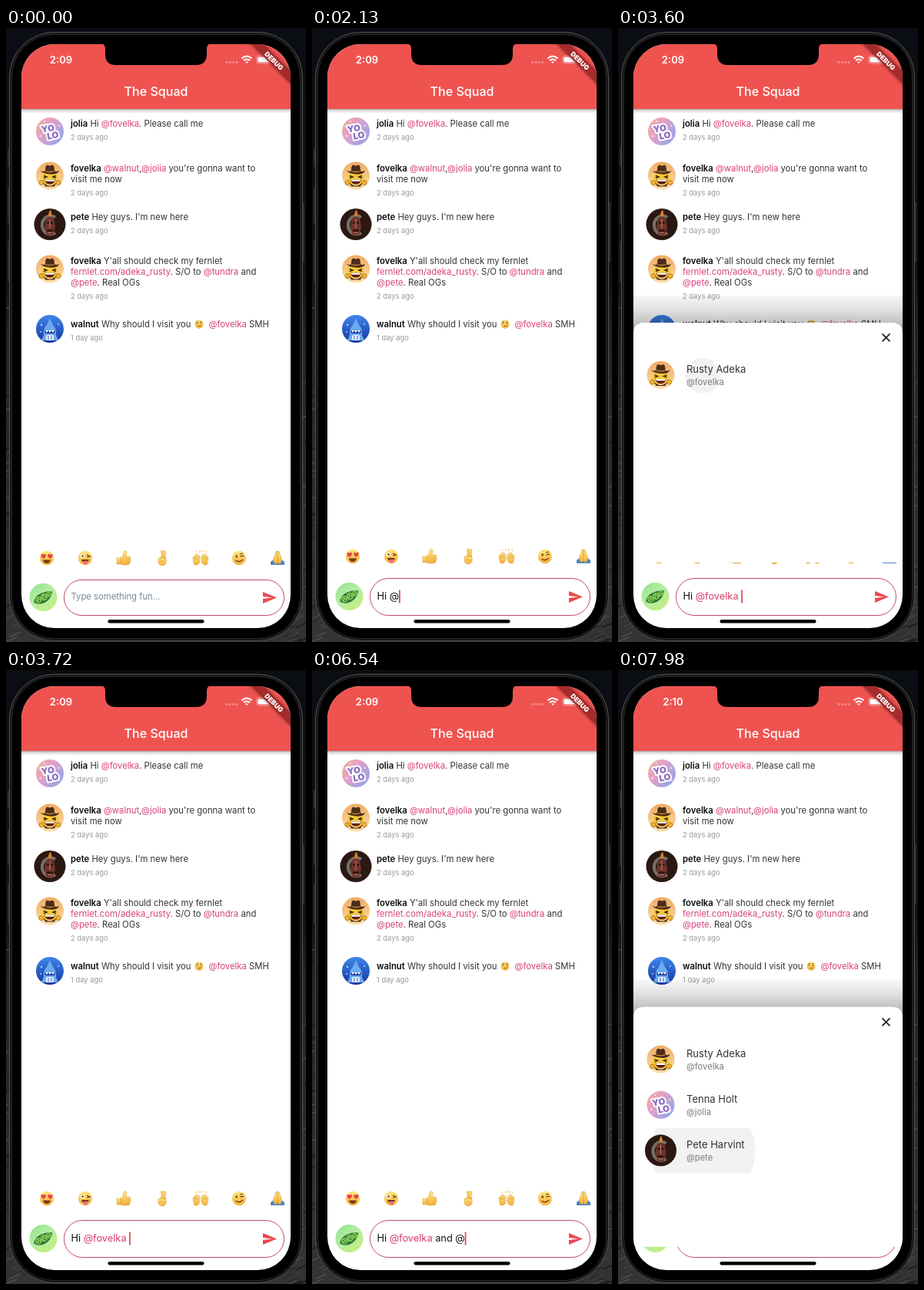
These frames come from a looping animation (390 by 796 pixels, 8 s). An HTML page:

```html
<!DOCTYPE html>
<html lang="en">
<head>
<meta charset="utf-8">
<title>Group chat mentions</title>
<style>
html, body { margin: 0; width: 100%; height: 100%; overflow: hidden; background: #0b0b0b; }
svg { display: block; width: 390px; height: 796px; font-family: Inter, Roboto, sans-serif; }
text { white-space: pre; }
.msg { font-size: 11.3px; fill: #333; }
.msg .b { font-weight: 600; fill: #0c0c0c; }
.at { fill: #d8407c; }
.ago { font-size: 9.4px; fill: #999; }
.name { font-size: 13px; fill: #333; }
.handle { font-size: 11.2px; fill: #7b7b7b; }
.typed { font-size: 12.8px; fill: #111; }
.typed .at { fill: #d63a66; }
</style>
</head>
<body>
<svg viewBox="0 0 390 796">
<defs>
  <clipPath id="screen"><rect x="20" y="21" width="350" height="757" rx="43"/></clipPath>
  <clipPath id="row"><rect id="rowClip" x="20" width="350" height="59"/></clipPath>
  <clipPath id="strip"><rect x="31" y="660" width="331" height="60"/></clipPath>
  <filter id="soft" x="-30%" y="-80%" width="160%" height="260%"><feGaussianBlur stdDeviation="2"/></filter>
  <linearGradient id="desk" x2="0" y2="1"><stop stop-color="#0a0d13"/><stop offset=".4" stop-color="#101113"/><stop offset=".5" stop-color="#232322"/><stop offset="1" stop-color="#343432"/></linearGradient>
  <linearGradient id="bar" x2="0" y2="1"><stop stop-opacity=".32"/><stop offset=".4" stop-opacity=".12"/><stop offset="1" stop-opacity="0"/></linearGradient>
  <linearGradient id="shade" x2="0" y2="1"><stop stop-opacity=".03"/><stop offset=".35" stop-opacity=".12"/><stop offset="1" stop-opacity=".36"/></linearGradient>
  <linearGradient id="yellow" x2="0" y2="1"><stop stop-color="#ffe680"/><stop offset="1" stop-color="#f3b03c"/></linearGradient>
  <linearGradient id="candy" x2="1" y2=".7"><stop stop-color="#f2b296"/><stop offset=".45" stop-color="#e3a0c6"/><stop offset="1" stop-color="#93a6ea"/></linearGradient>
  <linearGradient id="peach" x2="0" y2="1"><stop stop-color="#f0ab62"/><stop offset="1" stop-color="#fbe0ac"/></linearGradient>
  <linearGradient id="sea" x2="0" y2="1"><stop stop-color="#3f86ea"/><stop offset="1" stop-color="#1737a0"/></linearGradient>
  <linearGradient id="leaf" x2=".8" y2="1"><stop stop-color="#8fe28c"/><stop offset=".5" stop-color="#b4edA4"/><stop offset="1" stop-color="#c3ee7e"/></linearGradient>

  <g id="sticker">
    <circle r="18" fill="url(#candy)"/>
    <g fill="#f8d0e4"><circle cx="-12" cy="6" r="1.6"/><circle cx="12" cy="-7" r="1.4"/><circle cx="-7" cy="-13" r="1.2"/><circle cx="12" cy="8" r="1.8"/></g>
    <g font-size="11.5" font-weight="900" text-anchor="middle" fill="#8a6cc4" stroke="#fff" stroke-width="4" stroke-linejoin="round" paint-order="stroke" transform="rotate(-10)">
      <text x="-2" y="0">YO</text><text x="3" y="10">LO</text>
    </g>
  </g>
  <g id="cowboy">
    <circle r="18" fill="url(#peach)"/>
    <path d="M-9 8Q0 18 9 8L6 14H-6Z" fill="#5a3218"/>
    <ellipse cy="3" rx="11" ry="9" fill="#f8c938"/>
    <path d="M-12-7Q-8-4-6-7Q-6-14-3-14Q0-12 3-14Q6-14 6-7Q8-4 12-7Q11-1 0-2T-12-7Z" fill="#4c2c1a"/>
    <path d="M-6-6Q0-4 6-6" stroke="#c98a3a" stroke-width="1.3" fill="none"/>
    <path d="M-8 0l4 1.5-4 1.5M8 0L4 1.5l4 1.5" stroke="#3a2010" stroke-width="1.4" fill="none"/>
    <path d="M-7 5H7Q6 11 0 11T-7 5Z" fill="#5e2110"/><path d="M-6 5H6V7.2H-6Z" fill="#fff"/>
    <g fill="#f2b62e" stroke="#8a5313" stroke-width=".6"><circle cx="-11" cy="9" r="3"/><circle cx="11" cy="9" r="3"/></g>
  </g>
  <g id="mask">
    <circle r="20.5" fill="#2b1812"/>
    <path d="M7-9A11 12 0 1 0 7 11" fill="none" stroke="#777069" stroke-width="4"/>
    <path d="M-5-8Q0-12 5-8L7 4 4 14H-4L-7 4Z" fill="#6e3529"/>
    <path d="M-2-11Q-2-16 1-19Q3-14 2-10Z" fill="#d9822b"/>
    <path d="M-4-2H-1M1-2H4M-4 8H4" stroke="#1c0d09" stroke-width="2"/>
    <path d="M0-7V5M-3 11H3" stroke="#b57263" stroke-width="1.2"/>
  </g>
  <g id="fish">
    <circle r="18" fill="url(#sea)"/>
    <path d="M0-14L4-5Q9 0 8 8L11 15H-11L-8 8Q-9 0-4-5Z" fill="#6ba9f0"/>
    <path d="M-7 2H7L6 6H-6Z" fill="#1d3f9e"/><path d="M-6 2l2 3 2-3 2 3 2-3 2 3 2-3" fill="#fff"/>
    <rect x="-5" y="8" width="10" height="7" rx="2" fill="#e6f2ff"/><path d="M-2 9V14M2 9V14" stroke="#2a58c4"/>
    <g fill="#a5cfff"><circle cx="-11" cy="-5" r="1.3"/><circle cx="11" cy="-6" r="1.1"/><circle cx="-12" cy="4" r="1"/></g>
  </g>
  <g id="peas">
    <circle r="18" fill="url(#leaf)"/>
    <g transform="rotate(-28)">
      <path d="M-14 0Q-9-7 0-6T14-1Q8 7-1 7T-14 0Z" fill="#2f7a35"/>
      <g fill="#7cc653"><circle cx="-7" r="4.2"/><circle cx="1" r="4.6"/><circle cx="8.3" r="3.5"/></g>
      <path d="M-9-1h1M-6-1h1M-1-1h1M2-1h1M7-1h1M9.5-1h1M-8 2h2M0 2h2M8 2h1" stroke="#173f1a" stroke-width="1.2"/>
    </g>
  </g>

  <circle id="face" r="9.2" fill="url(#yellow)"/>
  <g id="e0"><use href="#face"/><path d="M-5 2.5H5Q4 7 0 7T-5 2.5Z" fill="#7a3a12"/>
    <g fill="#e5404a"><path id="heart" d="M-4.3 1Q-8-1.5-7.3-4.2Q-5.7-6-4.3-4Q-2.5-6-1-4.2Q-.6-1.5-4.3 1Z"/><use href="#heart" x="8.6"/></g></g>
  <g id="e1"><use href="#face"/><path d="M-5 2H5Q4 6 0 6T-5 2Z" fill="#7a3a12"/><path d="M-2 4H3V7Q.5 10-2 7Z" fill="#ee6a84"/>
    <circle cx="-3.7" cy="-2.5" r="2.5" fill="#fff"/><circle cx="-3.5" cy="-2.5" r="1.2" fill="#4a2810"/><path d="M2-4L6-2 2-1" stroke="#6b3a12" stroke-width="1.2" fill="none"/></g>
  <g id="e2" fill="url(#yellow)" stroke="#d99a34" stroke-width=".5"><path d="M-9 0H-4V8H-9Z"/>
    <path d="M-4 0Q0-3 0-8Q1-11 4-8Q4-5 3-2H7Q10-1 8.5 2Q10 4 8 5.5Q8.5 9 5 9H-1Q-4 9-4 7Z"/><path d="M4 2H8M4 5.5H8"/></g>
  <g id="e3" fill="url(#yellow)" stroke="#d99a34" stroke-width=".6"><path d="M2 2L-2-8Q-1-11 1-9L5 1Z"/><path d="M-3 2L2-9Q5-10 5-7L2 2Z"/>
    <path d="M-5 1Q-4-1-2 1Q0-1 4 1Q6 2 5 6Q4 10 0 10Q-5 9-5 5Z"/><path d="M-3 4Q1 3 3 6" fill="none"/></g>
  <g id="e4"><g id="palm"><path d="M-8 9Q-10 5-10-1Q-9-3-8-1L-7-4Q-6-6-5-4Q-3-6-3-3Q-1-4-1-1V4Q-2 8-4 9Z" fill="url(#yellow)" stroke="#d99a34" stroke-width=".5"/>
    <path d="M-8 2V-1M-6 2V-3M-4 2V-2" stroke="#d99a34" stroke-width=".6"/></g><use href="#palm" transform="scale(-1 1)"/>
    <path d="M-5-7L-6-9M-1-7V-10M3-7V-10M7-7L8-9" stroke="#f0b84a"/></g>
  <g id="e5"><use href="#face"/><path d="M-4.5 3Q0 7 5 2" stroke="#7a3a12" stroke-width="1.3" fill="none"/>
    <ellipse cx="-3.3" cy="-2" rx="1.2" ry="1.8" fill="#6b3a12"/><path d="M1.5-1.5Q4-4 6-2M1-5L5-6" stroke="#6b3a12" stroke-width="1.1" fill="none"/></g>
  <g id="e6"><path d="M-9 9V5L-5 2 0 6 5 2 9 5V9Z" fill="#4a86c4"/>
    <path id="hand" d="M0-9Q-3-9-3-5L-6 3-3 8 0 6Z" fill="url(#yellow)" stroke="#d99a34" stroke-width=".6"/><use href="#hand" transform="scale(-1 1)"/></g>
  <g id="smirk"><use href="#face"/><path d="M-2 4Q3 5 5 2M-6-2H-2M2-2H6M-6-5L-2-6M2-6L6-5" stroke="#6b3a12" stroke-width="1.3" fill="none"/></g>
</defs>

<rect width="390" height="796" fill="url(#desk)"/>
<g id="grain" stroke-width="1.5"></g>
<path d="M2 156h4v24H2zM2 207h4v46H2zM2 276h4v53H2zM384 226h4v78h-4z" fill="#2b2b2c"/>
<rect x="4.5" y="5.5" width="381" height="789" rx="58" fill="#161616" stroke="#545456"/>
<rect x="7.5" y="8.5" width="375" height="783" rx="55" fill="#000" stroke="#2a2a2c"/>

<g clip-path="url(#screen)">
  <rect x="20" y="21" width="350" height="757" fill="#fff"/>
  <g id="chat"></g>
  <rect x="20" y="105" width="350" height="6" fill="url(#bar)"/>
  <rect x="20" y="21" width="350" height="84" fill="#ef5350"/>
  <text x="195" y="88" font-size="16.1" font-weight="500" fill="#fff" text-anchor="middle">The Squad</text>
  <text id="clock" x="71.5" y="46" font-size="13.1" font-weight="600" fill="#fff" text-anchor="middle"></text>
  <path d="M287 44.5h.1M291.3 44.5h.1M295.6 44.5h.1M299.9 44.5h.1" stroke="#fff" stroke-opacity=".35" stroke-width="2.8" stroke-linecap="round"/>
  <g fill="none" stroke="#fff" stroke-width="1.9"><path d="M306.5 39.5Q313 33.5 319.5 39.5M309 42.3Q313 38.6 317 42.3"/><path d="M311.2 44L313 46 314.8 44Q313 42.6 311.2 44Z" fill="#fff" stroke="none"/></g>
  <rect x="325.8" y="36" width="20.5" height="10" rx="3" fill="none" stroke="#fff" stroke-opacity=".45"/>
  <rect x="327.3" y="37.5" width="17.5" height="7" rx="1.8" fill="#fff"/>

  <g id="emojis" clip-path="url(#strip)"></g>
  <use id="me" href="#peas" x="48.5"/>
  <rect id="field" x="75.5" width="286" fill="#fff" stroke="#c3476a"/>
  <path id="send" d="M334 730.5L352 738 334 745.5V739.6L346 738 334 736.4Z" fill="#ea4a50"/>
  <text id="hint" class="msg" x="84.5" y="741.3" style="fill:#7c8698">Type something fun...</text>
  <text id="typed" class="typed" x="84.5" y="741.3"></text>
  <rect id="caret" width="1.7" fill="#d8454f"/>

  <g id="sheet">
    <rect x="20" y="310" width="350" height="52" fill="url(#shade)"/>
    <path d="M20 656V359Q20 345 34 345H356Q370 345 370 359V656Z" fill="#fff"/>
    <path d="M343.5 359.5l10 10m0-10l-10 10" stroke="#222" stroke-width="1.7"/>
    <g clip-path="url(#row)"><circle id="ripple" cx="110.5" fill="#f2f2f2"/></g>
    <g id="loading"><text class="msg" x="161" y="518.5">Loading</text><g id="spinner" transform="translate(221 514.5)"></g></g>
    <g id="people"></g>
  </g>

  <g transform="translate(370 21) rotate(45)">
    <rect x="-40" y="25" width="80" height="11" opacity=".5" filter="url(#soft)"/>
    <rect x="-40" y="25" width="80" height="11" fill="#a52a2a"/>
    <text y="33.7" font-size="8.6" font-weight="900" fill="#fff" text-anchor="middle">DEBUG</text>
  </g>
  <rect x="132.5" y="767" width="125" height="4.5" rx="2.2"/>
</g>
<path d="M124 20.5Q129 21 129 27V34Q129 48 143 48H247Q261 48 261 34V27Q261 21 266 20.5Z" fill="#000"/>
</svg>

<script>
const $ = id => document.getElementById(id);
const set = (id, attrs) => { for (const k in attrs) $(id).setAttribute(k, attrs[k]); };
const clamp = x => Math.min(1, Math.max(0, x));

// Static content
const markup = s => s
  .replace(/@\w+|fernlet\.com\/\w+/g, '<tspan class="at">$&</tspan>')
  .replace(/\*(\w+)\*/, '<tspan class="b">$1</tspan>');
const text = (cls, x, y, s) => `<text class="${cls}" x="${x}" y="${y}">${markup(s)}</text>`;
const avatar = (id, x, y) => `<use href="#${id}" x="${x}" y="${y}"/>`;

const messages = [
  ['sticker', 134, 128, ['*jolia* Hi @fovelka. Please call me'], '2 days ago'],
  ['cowboy', 191.5, 185.5, ["*fovelka* @walnut,@jolia you're gonna want to", 'visit me now'], '2 days ago'],
  ['mask', 254.5, 249, ["*pete* Hey guys. I'm new here"], '2 days ago'],
  ['cowboy', 312.5, 306, ["*fovelka* Y'all should check my fernlet",
    'fernlet.com/adeka_rusty. S/O to @tundra and', '@pete. Real OGs'], '2 days ago'],
  ['fish', 390, 388, ['*walnut* Why should I visit you'], '1 day ago']
];
$('chat').innerHTML = messages.map(([pic, cy, y, lines, ago]) =>
  avatar(pic, 57, cy) +
  lines.map((s, i) => text('msg', 84, y + i * 14, s)).join('') +
  text('ago', 84, y + lines.length * 14 + 3, ago)).join('') +
  '<use href="#smirk" transform="translate(251 384) scale(.62)"/>' + text('msg', 263.5, 388, '@fovelka SMH');

$('people').innerHTML = [['cowboy', 'Rusty Adeka', '@fovelka'], ['sticker', 'Tenna Holt', '@jolia'], ['mask', 'Pete Harvint', '@pete']]
  .map(([pic, name, handle], i) => {
    const y = 413 + i * 59;
    return `<g>${avatar(pic, 55.5, y)}${text('name', 89, y - 3, name)}
      <text class="handle" x="89" y="${y + 13}">${handle}</text></g>`;
  }).join('');

for (let i = 0; i < 7; i++)
  $('emojis').innerHTML += avatar('e' + i, 53 + i * 50, 685);
for (let i = 0; i < 8; i++)
  $('spinner').innerHTML += `<path d="M0-3.5V-8" stroke="#3c3c44" stroke-width="1.8" stroke-linecap="round" transform="rotate(${i * 45})"/>`;

// Wood grain showing beside the phone
let seed = 7;
const rnd = () => (seed = seed * 16807 % 2147483647) / 2147483647;
for (let i = 0; i < 160; i++) {
  const x = rnd() < .5 ? rnd() * 24 : 390 - rnd() * 24, y = 345 + Math.sqrt(rnd()) * 451, c = 20 + rnd() * 60 | 0;
  $('grain').innerHTML += `<path d="M${x - 7} ${y + 3}l14-6" stroke="rgb(${c},${c},${c})"/>`;
}

// Timeline
const FOCUS = 450;
const keys = [
  [1290, 'H'], [1620, 'Hi'], [1800, 'Hi '], [2130, 'Hi @'], [2520, 'Hi @f'], [2790, 'Hi @fo'],
  [3570, 'Hi @fovelka '], [5010, 'Hi @fovelka a'], [5190, 'Hi @fovelka an'], [5280, 'Hi @fovelka and'],
  [5370, 'Hi @fovelka and '], [6060, 'Hi @fovelka and @'], [6690, 'Hi @fovelka and @p'], [7924, 'Hi @fovelka and @pete ']
];
const sheets = [
  { open: 2520, ready: 3060, tap: 3560, close: 3565, count: 1, row: 0 },
  { open: 6690, ready: 6930, tap: 7860, close: 7924.5, count: 3, row: 2 }
];
const SLIDE = 150, HEIGHT = 311;

// cubic-bezier(.42, 0, .58, 1)
function ease(x) {
  let lo = 0, hi = 1, s = .5;
  for (let i = 0; i < 20; i++) {
    s = (lo + hi) / 2;
    const bx = 1.26 * s * (1 - s) ** 2 + 1.74 * s * s * (1 - s) + s ** 3;
    if (bx < x) lo = s; else hi = s;
  }
  return s * s * (3 - 2 * s);
}

const pen = document.createElement('canvas').getContext('2d');
pen.font = '12.8px Inter, Roboto, sans-serif';

function blink(d) {
  const u = d % 910;
  return u < 490 ? 1 : u < 810 ? 1 - clamp((u - 490) / 100) : (u - 810) / 100;
}

function drawInput(t) {
  const p = clamp((t - 1290) / 160);
  const [at, str] = keys.filter(k => t >= k[0]).pop() || [FOCUS, ''];
  const top = 715.5 - 2 * p;
  set('field', { y: top, height: 761.5 - top, rx: (761.5 - top) / 2 });
  set('emojis', { transform: `translate(0 ${2 - 2 * p})` });
  set('me', { y: 738 - p });
  set('send', { transform: `translate(0 ${.5 - p})` });
  set('hint', { opacity: 1 - p });
  if ($('typed').textContent !== str)
    $('typed').innerHTML = str.replace(/@(fovelka|pete)/g, '<tspan class="at">$&</tspan>');
  set('caret', {
    x: 84.5 + pen.measureText(str).width, y: 731 - 2.5 * p, height: 15 + 2 * p,
    opacity: t < FOCUS ? 0 : blink(t - at)
  });
}

function drawSheet(t) {
  const s = sheets.find(s => t >= s.open && t < s.close + SLIDE);
  set('sheet', { visibility: s ? 'visible' : 'hidden' });
  if (!s) return;
  const away = t < s.close ? 1 - ease(clamp((t - s.open) / SLIDE)) : ease((t - s.close) / SLIDE);
  set('sheet', { transform: `translate(0 ${HEIGHT * away})` });
  const ready = t >= s.ready;
  set('loading', { display: ready ? 'none' : 'inline' });
  [...$('people').children].forEach((row, i) => row.setAttribute('display', ready && i < s.count ? 'inline' : 'none'));
  set('rowClip', { y: 384 + s.row * 59 });
  set('ripple', { cy: 413.5 + s.row * 59, r: Math.max(0, (t - s.tap) * .5625) });
  const head = Math.floor((t - s.open) / 125) + 4;
  [...$('spinner').children].forEach((tick, i) =>
    tick.setAttribute('opacity', Math.max(.2, .6 - .1 * ((head - i + 16) % 8))));
}

function frame(now) {
  const t = now % 8000;
  $('clock').textContent = t < 7860 ? '2:09' : '2:10';
  drawInput(t);
  drawSheet(t);
  requestAnimationFrame(frame);
}
requestAnimationFrame(frame);
</script>
</body>
</html>
```
